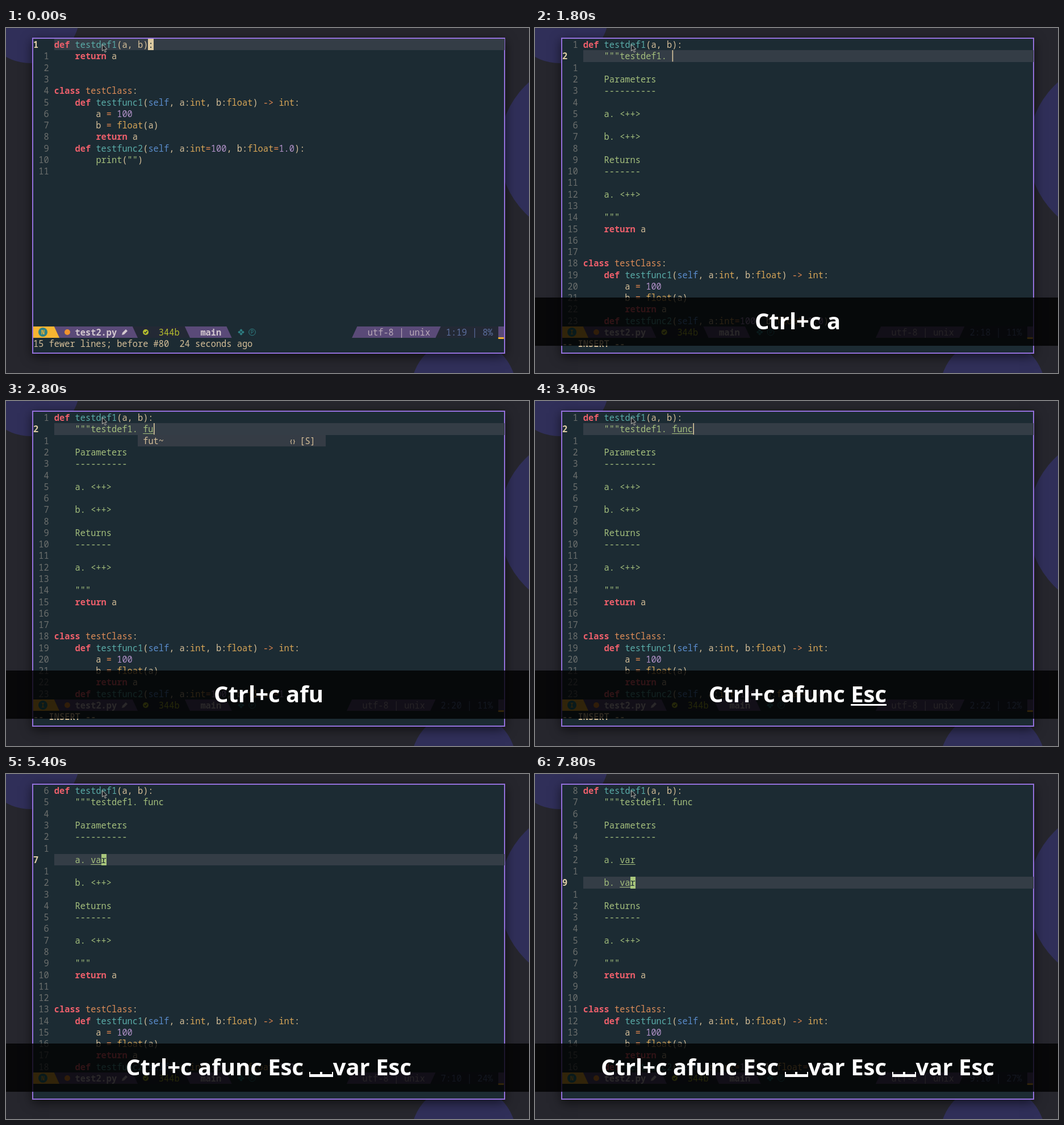
An HTML page that plays this animation: 921 px wide and 608 px high, repeating every 8 s.

```html
<!DOCTYPE html>
<html lang="en">
<head>
<meta charset="utf-8">
<title>Docstring editing</title>
<style>
html, body { margin: 0; width: 100%; height: 100%; overflow: hidden; background: #26262d; }
#stage { position: relative; width: 921px; height: 608px; overflow: hidden; }
#stage > svg { position: absolute; left: 0; top: 0; }
.frame { position: absolute; left: 46px; top: 17px; width: 829px; height: 553px;
  border: 2px solid #9370db; background: #1c2b33; box-shadow: 0 5px 18px rgba(0,0,0,.6); }
text { font: 15.33px "Noto Sans Mono", "DejaVu Sans Mono", monospace; white-space: pre; fill: #d4be98; }
.bold, .kw { font-weight: 700; }
.kw { fill: #ec5f6b; }
.fn { fill: #5aaca8; }
.cls { fill: #de8d58; }
.self { fill: #5a8ccc; }
.type { fill: #d8a657; }
.num { fill: #b292c9; }
.op { fill: #e2874e; }
.str { fill: #a3be7c; }
.nr { fill: #6c6f6d; text-anchor: end; }
.cur { fill: #e0cfa6; font-weight: 700; }
.ink { fill: #1c2b33; }
.lime { fill: #b5bd2e; }
.pos { fill: #5c6f9f; }
.name { fill: #d3c8cf; font-weight: 700; }
.right { fill: #b9aab8; }
.small { font-size: 10px; font-weight: 700; }
#keys { position: absolute; left: 0; top: 475px; width: 917px; height: 85px; padding-left: 4px;
  background: rgba(0,0,0,.8); color: #fff; text-align: center; white-space: pre;
  font: 700 40px/81px "Noto Sans", "Open Sans", sans-serif; }
#keys u { text-decoration: underline 3px; text-underline-offset: 3px; text-decoration-skip-ink: none; }
#keys i { position: relative; display: inline-block; box-sizing: border-box; width: 20.6px; height: 9px;
  border: solid #fff; border-width: 0 2px 5px; vertical-align: -3px; }
#keys u i::after { content: ""; position: absolute; left: -2px; right: -2px; bottom: -15px; height: 3px; background: #fff; }
</style>
</head>
<body>
<div id="stage">
  <svg width="921" height="608" fill="#302f59">
    <circle cx="43" cy="-25" r="87"/>
    <circle cx="1027" cy="214" r="159"/>
    <circle cx="806" cy="639" r="93"/>
  </svg>
  <div class="frame"></div>
  <svg id="screen" width="921" height="608"></svg>
  <svg width="921" height="608">
    <path d="M169.500 29v11.500l2.700-2.500 2.100 4.700 2-.9-2-4.500h3.600z" fill="#20242a" stroke="#c9c4bd" stroke-width=".9"/>
  </svg>
  <div id="keys"></div>
</div>
<script>
const LOOP = 8000, CELL = 9.2, LINE = 20.27;
const X = c => 48 + c * CELL, Y = r => Math.round(19.2 + r * LINE);
const PURPLE = '#5a4a78', YELLOW = '#f6b532', DARK = '#232935', TEAL = '#2f8286',
      CREAM = '#dcc9a0', GREEN = '#a9c67c', MENU = '#353c45';

const screen = document.getElementById('screen'), keyBar = document.getElementById('keys');

const esc = s => s.replace(/&/g, '&amp;').replace(/</g, '&lt;');
const text = (c, r, s, cls = '') =>
  `<text x="${X(c)}" y="${Y(r) + 16}" class="${cls}">${esc(s)}</text>`;
const rect = (x, y, w, h, fill) =>
  `<rect x="${x}" y="${y}" width="${w}" height="${h}" fill="${fill}"/>`;
const cells = (c, r, w, h, fill) => {
  const left = Math.round(X(c));
  return rect(left, Y(r), Math.round(X(c + w)) - left, Y(r + h) - Y(r), fill);
};
const disc = (x, y, r, fill) => `<circle cx="${x}" cy="${y}" r="${r}" fill="${fill}"/>`;

// Slanted status block; lean 1 is "\", lean 0 is "/"
function block(from, to, lean, fill) {
  const top = Y(25), end = Y(26), up = 1 - lean;
  return `<path d="M${X(from + up)} ${top}H${X(to + up)}L${X(to + lean)} ${end}H${X(from + lean)}z" fill="${fill}"/>`;
}

const TAIL = ['    return a', '', '', 'class testClass:',
  '    def testfunc1(self, a:int, b:float) -> int:', '        a = 100',
  '        b = float(a)', '        return a',
  '    def testfunc2(self, a:int=100, b:float=1.0):', '        print("")', ''];

function source(s) {
  const head = ['def testdef1(a, b):'];
  const doc = s.doc ? ['"""testdef1. ' + s.word, '', 'Parameters', '-'.repeat(10), '', 'a. ' + s.a, '',
    'b. ' + s.b, '', 'Returns', '-'.repeat(7), '', 'a. <++>', '', '"""'].map(l => '    ' + l) : [];
  return head.concat(doc, TAIL).slice(0, 25);
}

const TOKENS = /(\b(?:def|class|return)\b|test(?:def|func)\d|testClass|\bself\b|\b(?:int|float)\b|\bprint\b|""|\d+(?:\.\d+)?|->|=)/;
const KINDS = [[/^(def|class|return)$/, 'kw'], [/^test[df]/, 'fn'], [/^testC/, 'cls'], [/^self/, 'self'],
  [/^(int|float)$/, 'type'], [/^(print|"")$/, 'str'], [/^\d/, 'num'], [/^(->|=)$/, 'op']];

function code(line, r, isDoc) {
  if (isDoc) return text(4, r, line, 'str');
  let c = 4, out = '';
  line.split(TOKENS).forEach((part, i) => {
    const kind = i % 2 ? KINDS.find(k => k[0].test(part)) : null;
    if (part.trim()) out += text(c, r, part, kind ? kind[1] : '');
    c += part.length;
  });
  return out;
}

function status(s) {
  const k = s.edited ? 0 : -2, mid = Y(25) + 10;
  const pos = `${s.row + 1}:${s.col + 1} | ${s.pct}%`, p = 88 - pos.length;
  let out = cells(0, 25, 5, 1, YELLOW) + cells(19 + k, 25, 11, 1, DARK) +
    block(4, 19 + k, 1, PURPLE) + block(29 + k, 37 + k, 1, PURPLE) +
    cells(p - 2, 25, 91 - p, 1, DARK) + block(p - 18, p - 2, 0, PURPLE) +
    cells(89, 25, 1.1, 1, PURPLE) + rect(X(89), 545, 10, 3, YELLOW);
  out += disc(65, mid, 8, TEAL) +
    `<text x="65" y="${mid + 3.7}" class="small" text-anchor="middle" style="fill:${YELLOW}">${s.insert ? 'I' : 'N'}</text>`;
  out += disc(108, mid, 5, '#f0932e') + text(8, 25, 'test2.py', 'name');
  if (s.edited) out += `<path d="M204 541l1-4 6-6 3 3-6 6z" fill="#d3c8cf"/>`;
  const b = 246 + k * CELL;
  out += disc(b, mid, 5, '#b5bd2e') + `<path d="M${b - 2.5} ${mid}l2 2 3-4" fill="none" stroke="${DARK}" stroke-width="1.4"/>`;
  out += text(24 + k, 25, '344b', 'lime') + text(32 + k, 25, 'main', 'name');
  const g = 414 + k * CELL;
  for (const [dx, dy] of [[0, -3.2], [3.2, 0], [0, 3.2], [-3.2, 0]])
    out += `<path d="M${g + dx} ${mid + dy - 2.6}l2.600 2.600-2.600 2.600-2.600-2.600z" fill="${TEAL}"/>`;
  out += `<circle cx="${g + 19.5}" cy="${mid}" r="5.8" fill="none" stroke="${TEAL}"/>` +
    `<text x="${g + 19.5}" y="${mid + 3.2}" text-anchor="middle" style="font-size:9px;fill:${TEAL}">P</text>`;
  return out + text(p - 15, 25, 'utf-8 | unix', 'right') + text(p, 25, pos, 'pos');
}

function menu({ col, row, items }) {
  const list = items.slice(0, 26 - row), n = list.length, full = items.length > 9;
  let out = cells(col, row, 36, n, MENU);
  if (full) out += cells(col + 36, row, 1, n, '#4a5863') + cells(col + 36, row, 1, Math.round(n * .75), '#c0c6cd');
  list.forEach((item, i) => {
    const snip = item !== 'float';
    out += text(col + 1, row + i, item) + text(col + 31, row + i, snip ? '[S]' : '[A]');
    if (snip) out += `<text x="${X(col + 29) + .5}" y="${Y(row + i) + 13.5}" class="small" style="font-size:9px">{}</text>`;
  });
  return out;
}

function draw(s) {
  const lines = source(s);
  let out = cells(4, s.row, 86.2, 1, '#343d46');
  lines.forEach((line, r) => {
    out += r === s.row ? text(0, r, String(r + 1), 'cur') : text(3, r, String(Math.abs(r - s.row)), 'nr');
    out += code(line, r, s.doc && r > 0 && r < 16);
  });
  for (const [r, c, n] of s.marks) out += rect(X(4 + c), Y(r) + 18, n * CELL, 1, '#a3be7c');
  const c = s.col + 4;
  if (s.insert) out += rect(X(c) + .4, Y(s.row), 1.6, LINE, CREAM);
  else out += cells(c, s.row, 1, 1, s.block) + text(c, s.row, lines[s.row][s.col] || ' ', 'ink');
  out += status(s);
  out += s.insert ? text(0, 26, '-- INSERT --', 'bold') : text(0, 26, s.msg);
  if (s.pending) out += text(79, 26, '<20>');
  if (s.menu) out += menu(s.menu);
  screen.innerHTML = out;

  const boxes = k => k.replace(/_/g, '<i></i>'), cut = s.keys.length - s.hot;
  keyBar.style.display = s.keys ? '' : 'none';
  keyBar.innerHTML = boxes(s.keys.slice(0, cut)) + (s.hot ? `<u>${boxes(s.keys.slice(cut))}</u>` : '');
}

const F_ITEMS = ('for~ for~ fut~ from~ for/else~ float async/for~ try/finally~ async/for/else~ def~ def~ if~ if~ ' +
  'elif~ deff~ adef~ defi~ defm~ tryf~ adeff~ adefm~ cutf8~ tryef~ ifmain~').split(' ');
const V_ITEMS = ('var~ val~ void~ env~ div~ even~ move~ save~ over~ ivar~ eval~ have~ nav~ rev~ ' +
  'serve~ solve~ give~ live~ value~').split(' ');
const vMenu = (row, has = '') => ({ col: 10, row, items: V_ITEMS.filter(v => v.includes(has)) });

const K1 = 'Ctrl+c', K2 = K1 + ' afunc Esc', K3 = K2 + ' __var Esc', K4 = K3 + ' __var Esc';

// Each step changes only what it names
const STEPS = [
  [0, { doc: false, word: '', a: '<++>', b: '<++>', row: 0, col: 18, pct: 8, insert: false, edited: true,
        block: CREAM, msg: '15 fewer lines; before #80  24 seconds ago', marks: [], menu: null,
        pending: false, keys: '', hot: 0 }],
  [400, { doc: true, row: 1, col: 16, pct: 10, block: '#594941', msg: '', keys: K1, hot: 6 }],
  [600, { edited: false, msg: '"test2.py" 27L, 344C written', hot: 0 }],
  [1600, { insert: true, col: 17, pct: 11, msg: '', keys: K1 + ' a', hot: 1 }],
  [1800, { hot: 0 }],
  [2100, { word: 'f', col: 18, edited: true, marks: [[1, 17, 1]], keys: K1 + ' af', hot: 1 }],
  [2200, { menu: { col: 20, row: 2, items: F_ITEMS } }],
  [2300, { hot: 0 }],
  [2400, { word: 'fu', col: 19, marks: [[1, 17, 2]], keys: K1 + ' afu', hot: 1,
           menu: { col: 20, row: 2, items: ['fut~'] } }],
  [2800, { hot: 0 }],
  [3000, { word: 'fun', col: 20, pct: 12, marks: [[1, 17, 3]], keys: K1 + ' afun', hot: 1, menu: null }],
  [3100, { word: 'func', col: 21, marks: [[1, 17, 4]], keys: K1 + ' afunc' }],
  [3200, { hot: 0 }],
  [3400, { keys: K2, hot: 3 }],
  [3600, { insert: false, col: 20, block: GREEN }],
  [3800, { hot: 0 }],
  [4000, { keys: K2 + ' _', hot: 1, pending: true }],
  [4200, { keys: K2 + ' __', pending: false, insert: true, row: 6, col: 7, pct: 24, a: '', marks: [] }],
  [4300, { hot: 0 }],
  [4600, { keys: K2 + ' __v', hot: 1, a: 'v', col: 8 }],
  [4700, { menu: vMenu(7) }],
  [4800, { hot: 0 }],
  [4900, { keys: K2 + ' __va', hot: 1, a: 'va', col: 9 }],
  [5000, { menu: vMenu(7, 'va') }],
  [5100, { keys: K2 + ' __var', a: 'var', col: 10, menu: null }],
  [5200, { keys: K3, hot: 3 }],
  [5300, { insert: false, col: 9 }],
  [5400, { hot: 0, marks: [[6, 7, 3]] }],
  [5700, { keys: K3 + ' _', hot: 1, pending: true }],
  [5900, { keys: K3 + ' __', pending: false, insert: true, row: 8, col: 7, pct: 27, b: '', marks: [] }],
  [6100, { hot: 0 }],
  [6400, { keys: K3 + ' __v', hot: 1, b: 'v', col: 8 }],
  [6500, { menu: vMenu(9) }],
  [6600, { hot: 0 }],
  [6700, { keys: K3 + ' __va', hot: 1, b: 'va', col: 9, menu: vMenu(9, 'va') }],
  [6800, { keys: K3 + ' __var', b: 'var', col: 10, menu: null }],
  [6900, { hot: 0 }],
  [7600, { keys: K4, hot: 3 }],
  [7700, { insert: false, col: 9 }],
  [7800, { hot: 0, marks: [[6, 7, 3], [8, 7, 3]] }]
];

let state = {};
const states = STEPS.map(([at, change]) => ({ at, view: state = { ...state, ...change } }));

let shown = -1;
function tick() {
  const t = performance.now() % LOOP;
  const now = states.findLastIndex(s => s.at <= t);
  if (now !== shown) draw(states[shown = now].view);
  requestAnimationFrame(tick);
}
tick();
</script>
</body>
</html>
```
